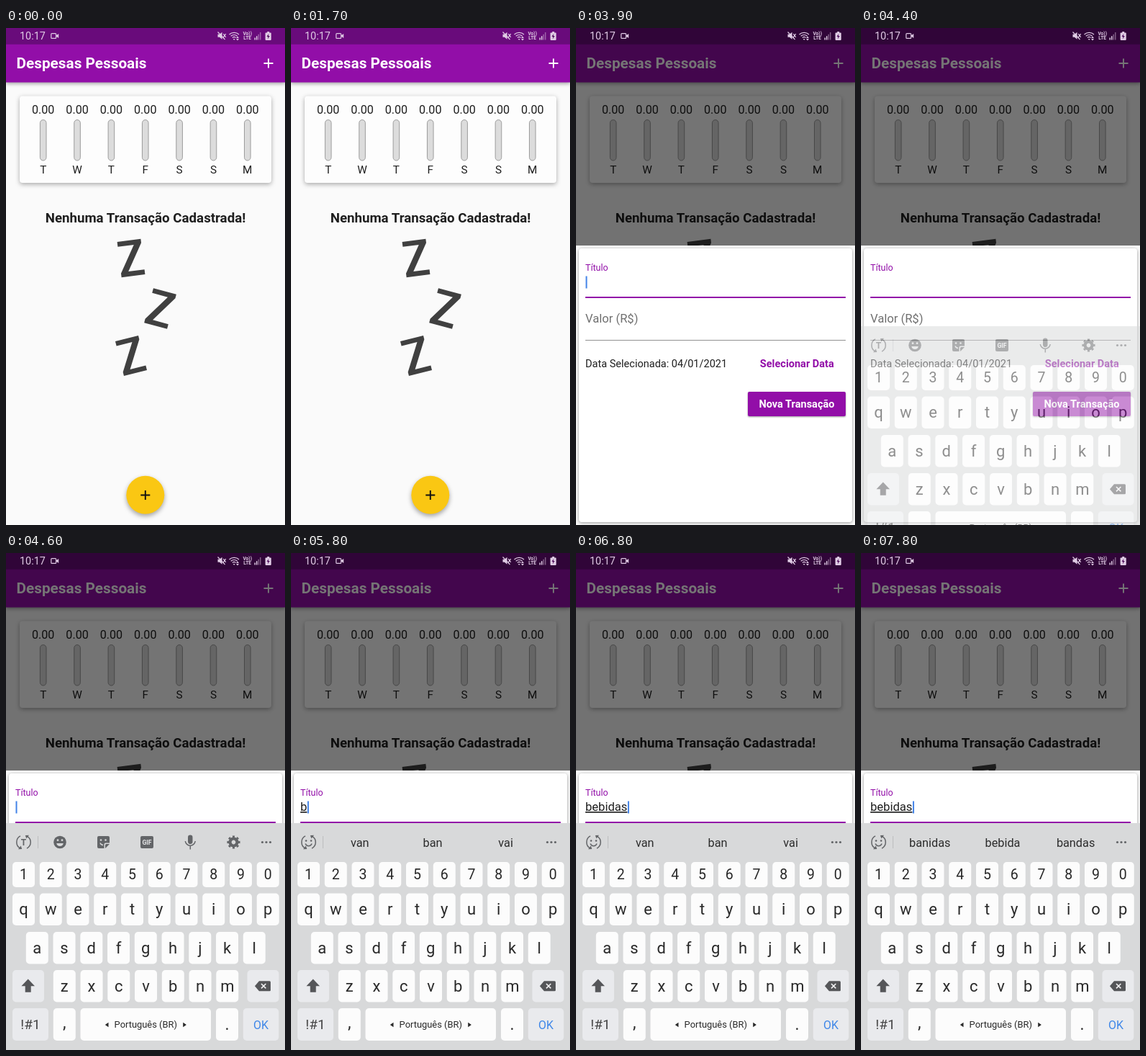
Write an HTML page that moves like this. It is 388 px wide and 690 px high and loops after 8000 ms.

```html
<!DOCTYPE html>
<html lang="pt-BR">
<head>
<meta charset="utf-8">
<title>Despesas Pessoais</title>
<style>
  html, body { margin: 0; width: 100%; height: 100%; overflow: hidden; background: #fafafa; }
  svg { display: block; width: 100vw; height: 100vh; font-family: Roboto, sans-serif; }
  text { white-space: pre; }
  .bold { font-weight: 700; }
  .mid { text-anchor: middle; }
  .body { font-size: 14.54px; }
  .field { font-size: 16.6px; }
  .purple { fill: #920ea8; }
  .ink { fill: #1f1f1f; }
  .bar { filter: drop-shadow(0 2px 2.5px rgba(0,0,0,.35)); }
  .card { filter: drop-shadow(0 2px 3px rgba(0,0,0,.33)); }
  .sheetCard { filter: drop-shadow(0 1px 2px rgba(0,0,0,.4)); }
  .fab { filter: drop-shadow(0 3px 3px rgba(0,0,0,.35)); }
  .button { filter: drop-shadow(0 1px 1px rgba(0,0,0,.4)); }
  .line { fill: none; stroke: #636568; stroke-width: 1.5; }
  .icon { fill: #636568; }
  .status { fill: #dfcbe4; }
  .statusLine { fill: none; stroke: #dfcbe4; stroke-width: 1.2; }
</style>
</head>
<body>
<svg viewBox="0 0 388 690" preserveAspectRatio="none">
  <defs>
    <path id="z" d="M-16.5-24.8H16.5v5.5L-6 18H16.5v6.8H-16.5v-5.5L6-18H-16.5z" fill="#404040"/>
    <g id="cycle">
      <path class="line" d="M-4.5-8.6A9.6 9.6 0 0 0-5 8.2M4.5 8.6A9.6 9.6 0 0 0 5-8.2"/>
      <path class="icon" d="M-7.5 9.8l5.2-.2-1.5-4.5zM7.5-9.8l-5.2 .2 1.5 4.5z"/>
    </g>
  </defs>

  <rect width="388" height="690" fill="#fafafa"/>
  <g id="home">
    <rect class="bar purple" width="388" height="75.5"/>
    <rect width="388" height="22.7" fill="#690b7b"/>
    <text class="bold" x="14.5" y="55.5" font-size="20.77" fill="#fff">Despesas Pessoais</text>
    <path d="M358.5 49h13M365 42.5v13" stroke="#fff" stroke-width="1.9"/>
    <rect class="card" x="19" y="94.5" width="350" height="120.5" rx="4" fill="#fdfdfd"/>
    <g id="chart" class="mid ink"></g>
    <text class="bold mid ink" x="194" y="270" font-size="18.7">Nenhuma Transação Cadastrada!</text>
    <use href="#z" transform="translate(174 319.5) rotate(-7)"/>
    <use href="#z" transform="translate(214.5 389.5) rotate(15)"/>
    <use href="#z" transform="translate(174 455) rotate(-14)"/>
    <circle class="fab" cx="193.8" cy="648.3" r="26.5" fill="#fac713"/>
    <path d="M187.3 648.5h13M193.8 642v13" stroke="#111" stroke-width="1.9"/>
  </g>

  <g id="modal">
    <rect width="388" height="690" fill-opacity=".54"/>
    <rect y="302" width="388" height="388" fill="#fafafa"/>
    <rect class="sheetCard" x="4" y="306" width="380" height="380" rx="4" fill="#fff"/>
    <text id="label" x="13"></text>
    <rect id="underline" x="13" width="362"/>
    <text id="entry" class="field ink" x="13" y="358" text-decoration="underline"></text>
    <rect id="cursor" y="344.5" width="2" height="17" fill="#4283e8"/>
    <text class="field" x="13" y="408.5" fill="#707070">Valor (R$)</text>
    <rect x="13" y="433" width="362" height="1" fill="#919191"/>
    <text class="body ink" x="13" y="471">Data Selecionada: 04/01/2021</text>
    <text class="body bold mid purple" x="307.3" y="471">Selecionar Data</text>
    <rect class="button purple" x="239" y="505" width="136" height="34" rx="2"/>
    <text class="body bold mid" x="307" y="527" fill="#fff">Nova Transação</text>
  </g>

  <g id="keyboard">
    <rect y="375" width="388" height="360" fill="#d8d9da"/>
    <use href="#cycle" x="24.5" y="401.5"/>
    <path d="M44.5 393v17" stroke="#bcbdbf"/>
    <g class="icon"><circle cx="356.5" cy="401.5" r="1.6"/><circle cx="362" cy="401.5" r="1.6"/><circle cx="367.5" cy="401.5" r="1.6"/></g>
    <g id="tools">
      <text class="bold mid icon" x="24.5" y="406" font-size="12">T</text>
      <g transform="translate(75 401.5)">
        <circle class="icon" r="8.8"/>
        <path d="M-4.8 1.5h9.6a4.9 4.9 0 0 1-9.6 0z" fill="#d8d9da"/>
        <circle cx="-3" cy="-2.8" r="1.4" fill="#d8d9da"/><circle cx="3" cy="-2.8" r="1.4" fill="#d8d9da"/>
      </g>
      <g transform="translate(135.5 401.5)">
        <path class="icon" d="M-6.5-8.5h13a2 2 0 0 1 2 2V1H3a2 2 0 0 0-2 2v5.5h-7.5a2 2 0 0 1-2-2v-13a2 2 0 0 1 2-2zM2.5 8.5V4a1.5 1.5 0 0 1 1.5-1.5h4.5z"/>
        <path d="M-4.5 1a4.5 4.5 0 0 0 4 3" fill="none" stroke="#d8d9da" stroke-width="1.4"/>
        <circle cx="-3.5" cy="-3" r="1.3" fill="#d8d9da"/><circle cx="3" cy="-3" r="1.3" fill="#d8d9da"/>
      </g>
      <rect class="icon" x="187" y="393" width="18" height="17" rx="2"/>
      <text class="bold mid" x="196" y="404.7" font-size="8.6" fill="#e6e7e8">GIF</text>
      <rect class="icon" x="253" y="391.5" width="6.5" height="12.5" rx="3.2"/>
      <path class="line" d="M249.3 400a7 7 0 0 0 13.9 0M256.3 407v4.5" stroke-width="1.8"/>
      <g transform="translate(316.5 401.5)" fill="none" stroke="#636568">
        <circle r="5" stroke-width="4.2"/>
        <circle r="7.7" stroke-width="2.8" pathLength="16" stroke-dasharray="1" stroke-dashoffset=".5"/>
      </g>
    </g>
    <g id="hints" class="mid" font-size="16.3" fill="#2c2c2c">
      <g class="icon"><circle cx="21" cy="399.5" r="1.3"/><circle cx="28" cy="399.5" r="1.3"/></g>
      <path class="line" d="M20 403.5a4.8 4.8 0 0 0 9 0"/>
      <text x="95.7" y="407.7"></text><text x="197" y="407.7"></text><text x="298.6" y="407.7"></text>
    </g>
    <g id="keys" class="mid" fill="#292929"></g>
    <path d="M30.7 591.5l9.3 9.8h-5.3v8.4h-8v-8.4h-5.3z" fill="#555659"/>
    <path d="M352 594.3h14.5a1.5 1.5 0 0 1 1.5 1.5v10.9a1.5 1.5 0 0 1-1.5 1.5H352l-6-7z" fill="#555659"/>
    <path d="M355 598l6.4 6.4m0-6.4l-6.4 6.4" stroke="#f1f1f3" stroke-width="1.6"/>
    <path d="M142.5 651.8v6.4l-4.7-3.2zM246.2 651.8v6.4l4.7-3.2z" fill="#292929"/>
  </g>

  <g id="statusBar">
    <text class="status" x="19" y="16.3" font-size="14.4">10:17</text>
    <rect class="statusLine" x="62.8" y="7.6" width="6.8" height="6.8" rx="1"/>
    <path class="status" d="M70 10.2l3.2-2.2v6l-3.2-2.2z"/>
    <path class="status" d="M294.5 8.8h2.5l3.5-3v10l-3.5-3h-2.5z"/>
    <path class="statusLine" d="M294.5 5.5l10 10.5M302.3 8.2l3.4 4.6m0-4.6l-3.4 4.6"/>
    <path class="statusLine" d="M310.5 9a10 10 0 0 1 13.5 0M312.7 11.3a6.5 6.5 0 0 1 9 0M315 13.5a3.2 3.2 0 0 1 4.4 0"/>
    <path class="status" d="M317.2 17l-1.4-2h2.8zM322 11.5l2 2.5h-4zM322 17.5l2-2.5h-4z"/>
    <g class="status bold mid" font-size="6.6"><text x="335.7" y="9.9">Vo))</text><text x="335.7" y="16.4">LTE</text></g>
    <path class="status" d="M345.5 13.5h1.5v3h-1.5zM348 11.2h1.5v5.3H348z"/>
    <path class="status" opacity=".45" d="M350.5 8.8h1.5v7.7h-1.5zM353 6h1.5v10.5H353z"/>
    <path class="status" d="M363.2 5h3v1.4h1.8a.8.8 0 0 1 .8.8v8.9a.8.8 0 0 1-.8.8h-6.6a.8.8 0 0 1-.8-.8V7.2a.8.8 0 0 1 .8-.8h1.8z"/>
    <path d="M365.4 8l-2.8 4h1.8l-.5 3.3 2.9-4.3h-1.9z" fill="#4a0757"/>
  </g>
</svg>
<script>
const LOOP = 8000;
const $ = id => document.getElementById(id);

function add(parent, tag, attrs, content = '') {
  const node = document.createElementNS('http://www.w3.org/2000/svg', tag);
  for (const name in attrs) node.setAttribute(name, attrs[name]);
  node.textContent = content;
  return parent.appendChild(node);
}

[...'TWTFSSM'].forEach((day, i) => {
  const x = 51.7 + i * 47.35;
  add($('chart'), 'text', { x, y: 118.7, 'font-size': 16.1 }, '0.00');
  add($('chart'), 'rect', { x: x - 4.3, y: 127.5, width: 8.6, height: 56.5, rx: 4.3, fill: '#dcdcdc', stroke: '#9c9c9c' });
  add($('chart'), 'text', { x, y: 202.4, 'font-size': 15.3 }, day);
});

const keys = {};
function addKey(text, x, y, w, h, size, baseline, fill = '#fcfcfc', ink = '#292929') {
  keys[text] = add($('keys'), 'rect', { x, y, width: w, height: h, rx: 5, fill });
  add($('keys'), 'text', { x: x + w / 2, y: baseline, 'font-size': size, fill: ink }, text);
}
function addRow(letters, x, y, h, size, baseline) {
  [...letters].forEach((c, i) => addKey(c, x + i * 37.75, y, 31, h, size, baseline));
}
const SOFT = '#e9eaed';
addRow('1234567890', 9, 429, 35, 19.5, 453);
addRow('qwertyuiop', 9, 472.5, 44.5, 22, 502.3);
addRow('asdfghjkl', 27.8, 526, 44.5, 22, 555.8);
addRow('zxcvbnm', 65.8, 579, 44.5, 22, 608.8);
addKey('', 9, 579, 44, 44.5, 1, 600, SOFT);
addKey('', 335.5, 579, 44, 44.5, 1, 600, SOFT);
addKey('!#1', 9, 632, 50, 45, 19, 661, SOFT, '#444');
addKey(',', 65.8, 632, 31, 45, 23, 660);
addKey('Português (BR)', 103.5, 632, 181.5, 45, 12.9, 659.4);
addKey('.', 292, 632, 31, 45, 23, 662);
addKey('OK', 329.8, 632, 49.5, 45, 16, 660.6, SOFT, '#3f87e8');

// Each step: [time, typed text, pressed key]
const typing = [
  [0, '', ''], [5700, '', 'b'], [5800, 'b', ''], [5900, 'b', 'e'], [6000, 'be', ''],
  [6100, 'beb', 'b'], [6200, 'bebi', 'i'], [6300, 'bebi', 'd'], [6400, 'bebid', ''],
  [6500, 'bebid', 'a'], [6600, 'bebida', ''], [6700, 'bebida', 's'], [6800, 'bebidas', '']
];
const cursorOn = [[3900, 4400], [4600, 5200], [5700, 7300], [7800, LOOP]];
const hintSlots = $('hints').querySelectorAll('text');
let pressed;

const show = (id, on) => $(id).setAttribute('display', on ? 'inline' : 'none');
function set(id, attrs) {
  for (const name in attrs) $(id).setAttribute(name, attrs[name]);
}

function render(t) {
  const focused = t >= 3900;
  show('modal', t >= 2400);
  set('label', focused
    ? { y: 337.3, 'font-size': 12.45, fill: '#920ea8' }
    : { y: 350, 'font-size': 16.6, fill: '#707070' });
  set('underline', focused
    ? { y: 373, height: 2, fill: '#920ea8' }
    : { y: 374, height: 1, fill: '#919191' });

  show('keyboard', t >= 4400);
  const [drop, opacity] = t < 4500 ? [39, .52] : t < 4600 ? [10, .88] : [0, 1];
  set('keyboard', { transform: `translate(0 ${drop})`, opacity });

  const [, text, key] = typing.findLast(step => t >= step[0]);
  $('entry').textContent = text;
  show('cursor', cursorOn.some(([from, to]) => t >= from && t < to));
  set('cursor', { x: 13.5 + (text ? $('entry').getComputedTextLength() : 0) });
  if (pressed) pressed.setAttribute('fill', '#fcfcfc');
  pressed = keys[key || null];
  if (pressed) pressed.setAttribute('fill', '#c6c8cb');

  show('tools', !text);
  show('hints', text);
  const hints = t < 7100 ? ['van', 'ban', 'vai'] : ['banidas', 'bebida', 'bandas'];
  hintSlots.forEach((slot, i) => slot.textContent = hints[i]);
}

$('label').textContent = 'Título';
const start = performance.now();
function tick() {
  render((performance.now() - start) % LOOP);
  requestAnimationFrame(tick);
}
tick();
</script>
</body>
</html>
```
